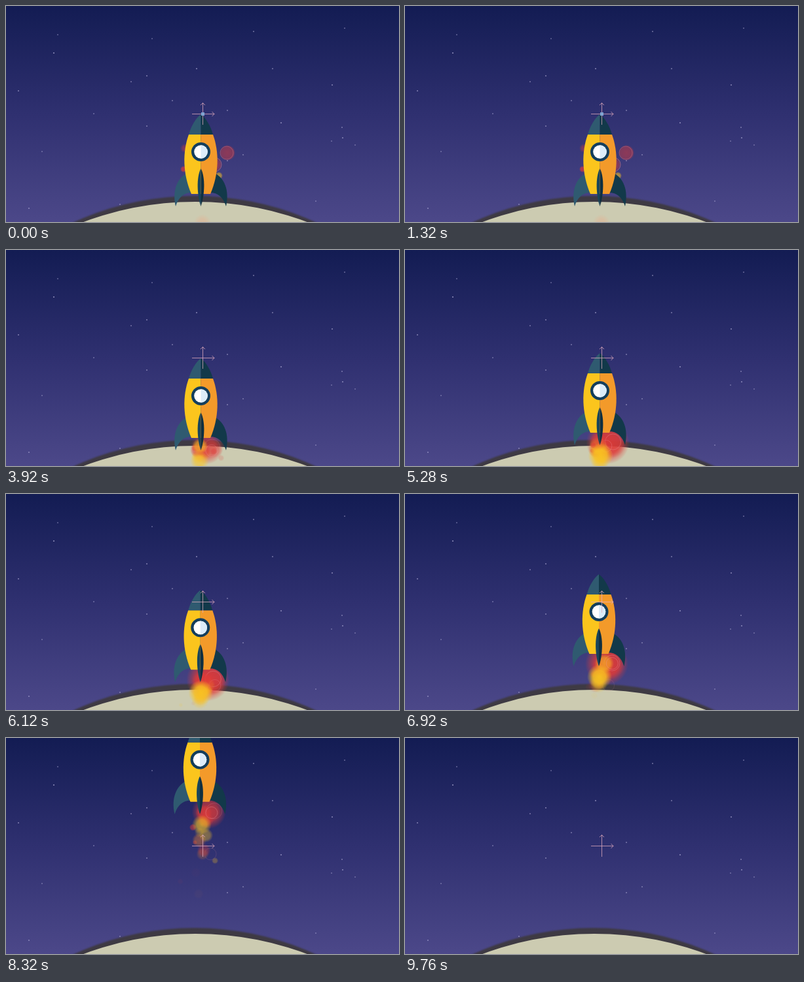
Recreate the animation shown at these times as an HTML page with a canvas. Size 600x331 px, loop 10 s.

```html
<!DOCTYPE html>
<html lang="en">
<head>
<meta charset="utf-8">
<title>Rocket launch</title>
<style>
  html, body { margin: 0; width: 100%; height: 100%; overflow: hidden; background: #30306f; }
  canvas { display: block; width: 600px; height: 331px; }
</style>
</head>
<body>
<canvas id="stage" width="600" height="331"></canvas>
<script>
const ctx = document.getElementById('stage').getContext('2d');
const LOOP = 10000;
const RED = '222,58,56', YELLOW = '249,196,32', ORANGE = '246,132,38';
const stars = [
  [79,44], [73,72], [19,130], [134,165], [55,223], [35,310], [191,116], [215,107], [223,50],
  [291,96], [254,145], [215,184], [378,39], [407,96], [517,34], [498,121], [338,160], [420,179],
  [513,186], [514,202], [497,207], [533,213], [362,228], [338,237], [473,299], [174,304]
];
// time (ms), height climbed (px)
const climb = [[0,0], [4160,0], [4700,3], [5280,8], [6240,21], [6920,43], [7280,62], [8320,190], [8900,345], [10000,700]];

const clamp = x => Math.max(0, Math.min(1, x));
const ramp = (t, a, b) => clamp((t - a) / (b - a));
const random = n => { const x = Math.sin(n * 127.1 + 31.7) * 43758.5453; return x - Math.floor(x); };

function slope(i) {
  if (i < 2) return 0;
  const a = climb[i - 1], b = climb[Math.min(i + 1, climb.length - 1)];
  return (b[1] - a[1]) / (b[0] - a[0]);
}

function altitude(t) {
  let i = 0;
  while (i < climb.length - 2 && t >= climb[i + 1][0]) i++;
  const [t0, y0] = climb[i], [t1, y1] = climb[i + 1];
  const d = t1 - t0, u = (t - t0) / d, v = 1 - u;
  return y0 * v * v * (1 + 2 * u) + y1 * u * u * (3 - 2 * u)
    + d * u * v * (slope(i) * v - slope(i + 1) * u);
}

const drift = t => -1.5 * ramp(t, 5300, 6900);

function disc(x, y, r, fill) {
  ctx.fillStyle = fill;
  ctx.beginPath();
  ctx.arc(x, y, r, 0, 7);
  ctx.fill();
}

function ring(x, y, r, alpha) {
  ctx.strokeStyle = `rgba(240,150,160,${alpha})`;
  ctx.lineWidth = .8;
  ctx.beginPath();
  ctx.arc(x, y, r, 0, 7);
  ctx.stroke();
}

function glow(x, y, r, rgb, alpha, core = .45) {
  const g = ctx.createRadialGradient(x, y, 0, x, y, r);
  g.addColorStop(0, `rgba(${rgb},${alpha})`);
  g.addColorStop(core, `rgba(${rgb},${alpha * .85})`);
  g.addColorStop(1, `rgba(${rgb},0)`);
  disc(x, y, r, g);
}

function shape(path, fill) {
  ctx.fillStyle = fill;
  ctx.fill(new Path2D(path));
}

function drawSky() {
  const g = ctx.createLinearGradient(0, 0, 0, 331);
  g.addColorStop(0, '#131c53');
  g.addColorStop(.5, '#2f3070');
  g.addColorStop(1, '#4c4889');
  ctx.fillStyle = g;
  ctx.fillRect(0, 0, 600, 331);
  stars.forEach(([x, y], i) => disc(x, y, 1.1, `rgba(185,180,220,${.4 + .3 * random(i)})`));
}

function drawPlanet() {
  ctx.filter = 'blur(1.2px)';
  disc(288, 734, 443, '#3e3a43');
  ctx.filter = 'blur(.7px)';
  disc(289, 787, 487, '#cccbb1');
  ctx.filter = 'none';
}

function drawIdleSparks() {
  glow(338, 225, 12, RED, .5, .8);
  ring(337, 225, 10, .35);
  glow(318, 243, 12, RED, .5, .7);
  ring(318, 243, 11, .5);
  glow(273, 218, 7, RED, .45);
  glow(271, 250, 5, RED, .75, .6);
  glow(325, 260, 6, YELLOW, .6, .6);
  glow(300, 332, 13, '240,165,130', .35);
}

function drawFlame(t) {
  const power = ramp(t, 3350, 4400) * (1 - .4 * ramp(t, 7200, 8320));
  const x = 298 + drift(t), y = 288 - altitude(t);
  const wobble = Math.sin(t / 130) * 2.5;
  if (y > -80 && power > 0) {
    glow(x + 11 + wobble, y + 15, 16 + 17 * power, RED, .45 + .45 * power, .55);
    glow(x + 17 - wobble, y + 17, 18 * power + 4, RED, .55 * power, .6);
    ring(x + 19 + wobble, y + 14, 12, .4 * power);
  }
  for (let i = 0; i < 110; i++) {
    const born = 3400 + i * 50, life = 450 + 400 * random(i);
    const age = (t - born) / life;
    if (age < 0 || age > 1) continue;
    const small = i % 3 === 0;
    const spread = small ? 78 : 26;
    const px = 299 + (random(i + 200) - .5) * spread * (.4 + .6 * age);
    const py = 300 - altitude(born) + age * (18 + 26 * random(i + 400));
    const r = small ? 3 + 3 * random(i + 600) : (15 - 6 * age) * (.6 + .4 * power);
    const rgb = i % 3 === 1 && age > .3 ? ORANGE : i % 5 === 0 ? YELLOW : RED;
    glow(px, py, r, rgb, (1 - age) * .65, .6);
    if (i % 7 === 0) ring(px + 12, py, 9, .45 * (1 - age));
  }
  if (y > -80 && power > 0) {
    glow(x + wobble, y + 35, 9 + 10 * power, YELLOW, .3 + .65 * power, .5);
    glow(x - 1, y + 47, 13 * power, YELLOW, .5 * power);
  }
}

// Drawn around the vertical axis, with the nose at the top
function drawRocket(t) {
  ctx.save();
  ctx.translate(297.5 + drift(t), 166 - altitude(t));
  const fin = 'M-21 90 C-36 98 -44 116 -38.5 141 C-34 127 -26 120 -14 120 Z';
  const body = 'M0 31 H-18.5 C-28 57 -28 91 -14.5 122 H0 Z';
  const nose = 'M0 0 C-8 6 -15 18 -18.5 31 H0 Z';
  const blade = 'M0 83 C-7 96 -6 124 0 141 Z';
  const halves = [
    [1, '#2f5a70', '#fbc51d', '#18455b'],
    [-1, '#12394a', '#f39a2a', '#102f40']
  ];
  for (const [side, dark, bright, edge] of halves) {
    ctx.save();
    ctx.scale(side, 1);
    shape(fin, dark);
    shape(body, bright);
    shape(nose, dark);
    shape(blade, edge);
    ctx.restore();
  }
  disc(0, 57.5, 14.5, '#133e5d');
  disc(0, 57.5, 10.3, '#ffffff');
  shape('M0 47.2 A10.3 10.3 0 0 1 0 67.8 Z', '#dcecf9');
  ctx.restore();
}

function drawAxes(t) {
  ctx.strokeStyle = 'rgba(226,172,190,.75)';
  ctx.lineWidth = 1;
  ctx.stroke(new Path2D('M284 165.5 H318 M314.5 162 L318 165.5 L314.5 169 M300.5 182 V148.5 M297 152 L300.5 148.5 L304 152'));
  if (t < 3200) {
    ctx.fillStyle = '#7fa3d0';
    ctx.fillRect(298, 163, 5, 5);
  }
}

function frame(now) {
  const t = now % LOOP;
  drawSky();
  drawPlanet();
  if (t < 3200) drawIdleSparks();
  drawFlame(t);
  // The stage stays empty briefly before the loop restarts
  if (t < 9400) drawRocket(t);
  drawAxes(t);
}

const start = performance.now();
function tick() {
  frame(performance.now() - start);
  requestAnimationFrame(tick);
}
tick();
</script>
</body>
</html>
```
